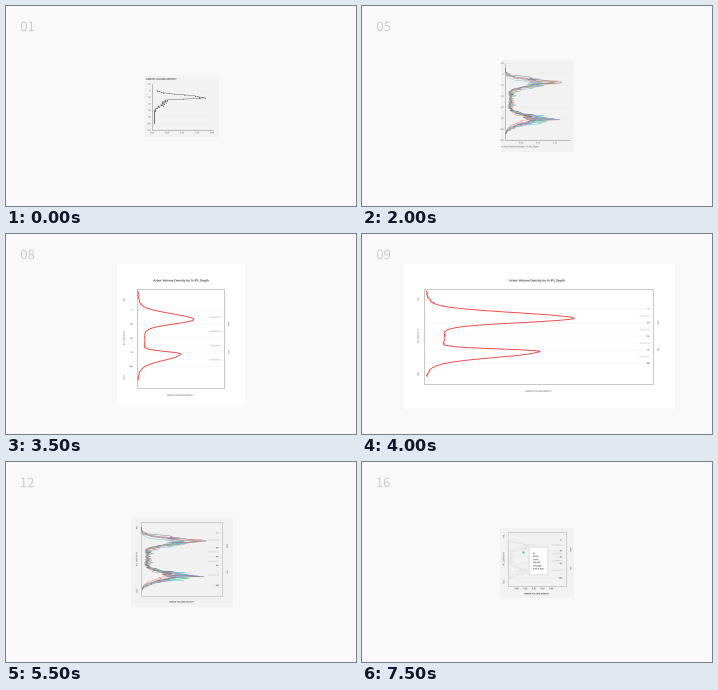
Animation, 350 px wide and 200 px high, one loop 8000 ms. Source, as a matplotlib script:

```python
import matplotlib.pyplot as plt
import numpy as np
from matplotlib.animation import ArtistAnimation
from matplotlib.lines import Line2D
from matplotlib.patches import PathPatch, Rectangle
from matplotlib.path import Path
from matplotlib.textpath import TextPath
from matplotlib.transforms import Affine2D

W, H, DPI = 350, 200, 100
PX = 72 / DPI
INK, MID, SOFT, GRID = "#444444", "#999999", "#b8b8b8", "#e6e6e6"
RED = "#f5403c"
COLORS = ["#ec7f78", "#4fb878", "#5f88d8", "#4fc8d2", "#e59a52",
          "#b884cc", "#666666"]
AXIS_LABEL = "ARBOR VOLUME DENSITY"

fig = plt.figure(figsize=(W / DPI, H / DPI), dpi=DPI, facecolor="#f9f9f9")
ax = fig.add_axes([0, 0, 1, 1])
ax.set(xlim=(0, W), ylim=(H, 0))
ax.axis("off")
arts = []


def add(artist):
    artist.set_zorder(len(arts) + 1)
    ax.add_artist(artist)
    arts.append(artist)


def rect(x0, y0, x1, y1, fill="none", edge="none", lw=.8):
    add(Rectangle((x0, y0), x1 - x0, y1 - y0, fc=fill, ec=edge, lw=lw * PX))


def line(xs, ys, color=INK, lw=.5, **kw):
    add(Line2D(xs, ys, color=color, lw=lw * PX, solid_joinstyle="round", **kw))


def text(x, y, s, size=2.1, color=INK, ha=.5, rot=0, bold=False,
         font="Liberation Sans"):
    """Vector text; x is the anchor at share ha, y the baseline (or centre if turned)."""
    prop = dict(family=font, weight="bold" if bold else "normal")
    path = TextPath((0, 0), s, size=size, prop=prop)
    box = path.get_extents()
    move = Affine2D().translate(-box.x0 - ha * box.width,
                                -size * .36 if rot else 0)
    move.scale(1, -1).rotate_deg(-rot).translate(x, y)
    add(PathPatch(Path(move.transform(path.vertices), path.codes),
                  fc=color, ec="none", lw=0))


def bump(d, centre, height, before, after):
    """Bell with its own width on each side of the centre."""
    width = np.where(d < centre, before, after)
    return height * np.exp(-((d - centre) / width) ** 2 / 2)


def plot(box, y0, y100, d, v, color, lw, **kw):
    line(box[0] + v * (box[2] - box[0]), y0 + d * (y100 - y0) / 100,
         color, lw, **kw)


def smooth_curve(box, y0, y100):
    d = np.linspace(-33, 124, 110)
    v = bump(d, 17, .59, 10, 8) + bump(d, 78, .44, 4.2, 11)
    v += bump(d, 50, .09, 40, 37)
    v += np.random.default_rng(4).normal(0, .0025, d.size)
    plot(box, y0, y100, d, v, RED, .9)


def rough_curves(box, y0, y100, reach=1, colors=COLORS, lw=.5, alpha=.8):
    for k, color in enumerate(colors):
        rng = np.random.default_rng(31 + k)
        d = np.arange(-10, 109, 1.9)
        tall, low = rng.uniform(.4, .72, 2) * (1, .68)
        shift = rng.normal(0, 1.5, 2)
        v = bump(d, 15 + shift[0], tall, 5.5, 7)
        v += bump(d, 82 + shift[1], low, 7, 8) + bump(d, 50, .075, 25, 30)
        v *= np.exp(rng.normal(-.05, .28, d.size))
        plot(box, y0, y100, d, reach * np.minimum(v, .8), color, lw, alpha=alpha)


def single_curve(box, y0, y100):
    d = np.linspace(0, 98, 46)
    v = bump(d, 22, .78, 9, 3.5) + bump(d, 40, .22, 9, 7) + .04
    v += (v > .15) * np.random.default_rng(7).normal(0, .05, d.size)
    plot(box, y0, y100, d, v, "#666666", .5, marker="o", ms=.6, mew=0)


def open_axes(box, first, gap):
    """Open axes with depth labels; returns the heights of 0 and 100 %."""
    x0, top, x1, bottom = box
    rows = np.linspace(top, bottom, 8)
    for i, y in enumerate(rows):
        line([x0, x1], [y, y], "#ebebeb", .4)
        text(x0 - 1.5, y + .8, str(20 * i - 20), 2, ha=1)
    line([x0, x0, x1], [top, bottom, bottom], MID, .6)
    for i, x in enumerate(np.arange(first, x1, gap)):
        start = 0 if first == x0 else 1
        text(x, bottom + 3.3, f"{.05 * (i + start):.2f}", 2)
    return rows[1], rows[6]


def layers(box, y0, y100, pad):
    """Turned names of the layers beside the plot."""
    x0, top, x1, bottom = box
    for y, s in (((top + y0) / 2, "INL"), ((y0 + y100) / 2, "IPL_DEPTH %"),
                 ((bottom + y100) / 2, "GCL")):
        text(x0 - pad, y, s, rot=90)
    for share, s in ((.25, "OFF"), (.75, "ON")):
        text(x1 + 5.2, y0 + share * (y100 - y0), s, rot=90)


def depth_marks(box, y0, y100, marks, names, outside=False):
    x0, _, x1, _ = box
    span = (y100 - y0) / 100
    for d in marks:
        y = y0 + d * span
        line([x0, x1], [y, y], GRID, .4)
        text(x0 - 4.5 if outside else x1 - 4.8, y + .7, str(d), 1.9,
             ha=1 if outside else .5, bold=True)
    for d in names:
        text(x1 - 3, y0 + d * span + .7, "(sublamina)", 2.1,
             MID if outside else SOFT, ha=1)


def single(colors=None):
    box = (146, 78, 207, 124)
    rect(137.5, 69, 213, 131, "#f3f3f3")
    text(140, 73.8, AXIS_LABEL, 2.4, ha=0, bold=True)
    depth = open_axes(box, 146, 15)
    if colors:
        rough_curves(box, *depth, 1.15, colors)
    else:
        single_curve(box, *depth)


def tall(colors, stretch=0):
    box = (143, 57, 207.5, 134 + stretch)
    rect(139, 54, 211.5, 146 + stretch, "#f2f2f2")
    rough_curves(box, *open_axes(box, 159, 17), 1.2, colors)
    text(139.5, 141.3 + stretch, "% Arbor Volume Density v. % IPL Depth", 2.1,
         ha=0)


def plain(curve):
    box = (143, 45, 209, 150)
    rect(138, 40, 212, 162, "#f3f3f3")
    curve(box, *open_axes(box, 159, 17))
    text(176, 158.5, AXIS_LABEL)


def red(box, early=False):
    x0, top, x1, bottom = box
    y0, y100 = (top + share * (bottom - top) for share in (.21, .782))
    rect(x0 - 20, top - 25, x1 + 21.5, bottom + (17 if early else 25), "white")
    mid = (x0 + x1) / 2
    text(175, top - 7.5, "Arbor Volume Density by % IPL Depth", 3.1, bold=True)
    depth_marks(box, y0, y100, range(0, 101, 25), range(13, 101, 25), early)
    rect(*box, edge="#bbbbbb")
    smooth_curve(box, y0, y100)
    layers(box, y0, y100, 13 if early else 6)
    text(mid, bottom + 7.8, AXIS_LABEL)


def framed(box, reach, pad=8, tick_step=0, colors=COLORS):
    x0, top, x1, bottom = box
    y0, y100 = (top + share * (bottom - top) for share in (.148, .856))
    label_y = bottom + (8.8 if tick_step else 6.5)
    rect(x0 - pad, top - 4, x1 + pad + .5, label_y + 4, "#f2f2f2")
    depth_marks(box, y0, y100, (0, 28, 45, 62, 100), (13, 36, 54, 80))
    rect(*box, edge="#c4c4c4")
    rough_curves(box, y0, y100, reach, colors)
    layers(box, y0, y100, 4.4)
    if tick_step:
        for i in range(1, int(.8 / tick_step) + 1):
            text(x0 + i * tick_step * (x1 - x0), bottom + 3.7,
                 f"{.05 * i:.2f}", 2, bold=True)
    text((x0 + x1) / 2, label_y, AXIS_LABEL, 1.95, bold=True)


def hover():
    framed((146, 70, 203.5, 123.5), .75, tick_step=.15, colors=["#e2e2e2"] * 3)
    line([160.7], [90], "#3fcfb0", marker="o", ms=1.7, mew=0)
    rect(165.5, 83.5, 187, 113.5, "#e9e9e9")
    rect(167.5, 85.5, 185, 111.5, "white")
    fields = (("ID", "20161"), ("TYPE", "ON-OFF"), ("VOLUME", "0.05 at 32%"))
    for i, (name, value) in enumerate(fields):
        text(171, 92 + 6.3 * i, name, 2, ha=0, bold=True)
        text(171, 94.8 + 6.3 * i, value, 2, ha=0, bold=True)


SCENES = [
    ("01", single),
    ("02", lambda: single(COLORS[:3])),
    ("03", lambda: tall(COLORS[:3], 4)),
    ("04", lambda: tall(COLORS[:5])),
    ("05", lambda: tall(COLORS)),
    ("06", lambda: plain(rough_curves)),
    ("07", lambda: plain(smooth_curve)),
    ("08", lambda: red((131, 55, 217.5, 154), early=True)),
    ("09", lambda: red((62, 55, 291, 150))),
    ("10", lambda: red((132, 51, 217.5, 149))),
    ("11", lambda: framed((127, 34, 227, 164), 1.05, 14)),
    ("12", lambda: framed((135, 60, 216, 134), 1.1, 10)),
    ("13", lambda: framed((135, 60, 216, 136), 1.1, 10, .2)),
    ("14", lambda: framed((146, 58, 203.5, 132.5), .95, 8, .2)),
    ("14", lambda: framed((146, 53, 203.5, 139), .95, 8, .2)),
    ("16", hover),
]

slides = []
for number, draw in SCENES:
    arts = []
    text(15, 25.2, number, 13, "#cccccc", ha=0, font="Noto Sans CJK JP")
    draw()
    slides.append(arts)

anim = ArtistAnimation(fig, slides, interval=500, repeat=True, repeat_delay=0)
plt.show()
```
